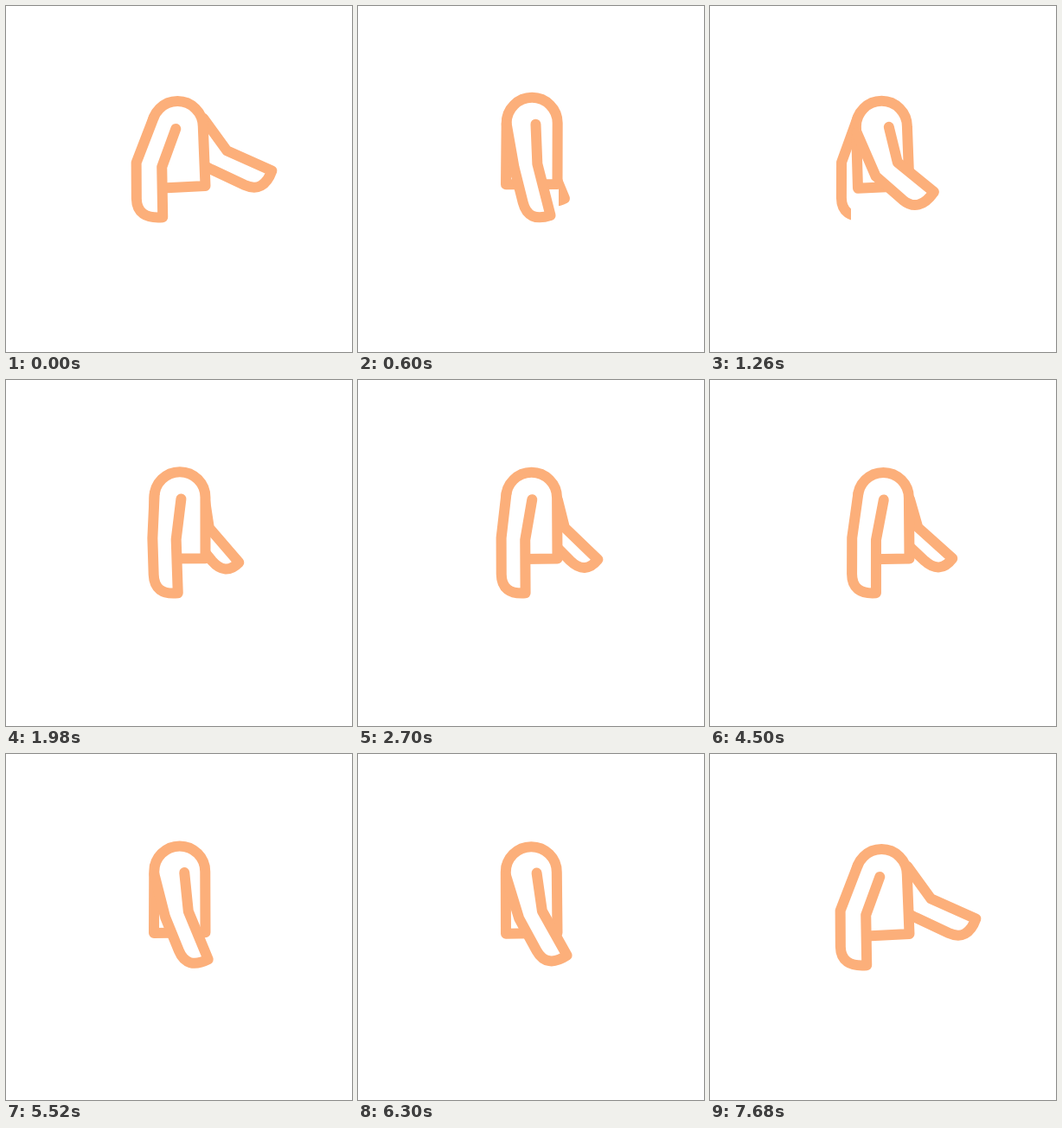
An HTML page with a canvas that plays this animation: 400 px wide and 400 px high, repeating every 7800 ms.

```html
<!DOCTYPE html>
<html lang="en">
<head>
<meta charset="utf-8">
<title>Walking jacket</title>
<style>
html, body { margin: 0; height: 100%; overflow: hidden; background: #fff; }
canvas { display: block; }
</style>
</head>
<body>
<canvas id="stage" width="400" height="400"></canvas>
<script>
const g = document.getElementById('stage').getContext('2d');
const INK = '#fcaf7a', PAPER = '#fff';
const LOOP = 7800, STEP = 60, STRIDE = 2410, STRIDES = 3, RADIUS = 29.5;

const ramp = (t, from, to) => Math.min(1, Math.max(0, (t - from) / (to - from)));

// Near arm's swing: -1 is fully back, 1 fully forward; it rests after the last stride.
function swingAt(t) {
  const p = t < STRIDES * STRIDE ? t % STRIDE : 0;
  return 2 * (ramp(p, 60, 960) - ramp(p, 1250, 2340)) - 1;
}

// Value between the back and forward extremes, bowed in mid-swing.
const mix = (s, back, front, bow = 0) =>
  (back + front) / 2 + (front - back) / 2 * s + bow * (1 - s * s);

const radians = deg => deg * Math.PI / 180;

function nearArm(s) {
  return {
    dx: mix(s, -2, 8.5), dy: mix(s, 2.5, 0.5),
    upper: radians(mix(s, -20, 14, 2)), upperLength: mix(s, 47, 42, 2),
    fore: radians(mix(s, 1, 52, -18)), foreLength: mix(s, 58, 54, 6),
    width: mix(s, 30, 30, -3)
  };
}

function farArm(s) {
  return {
    dx: mix(s, -2, 30, 11), dy: mix(s, 2.5, -9.5, 11),
    upper: radians(mix(s, -20, 36, -10)), upperLength: mix(s, 47, 46, -17),
    fore: radians(mix(s, 0, 66, -4)), foreLength: mix(s, 58, 57, -5),
    width: mix(s, 30, 28, -7)
  };
}

function paint() {
  g.fillStyle = PAPER;
  g.fill();
  g.stroke();
}

function drawArm(cx, cy, { dx, dy, upper, upperLength, fore, foreLength, width }) {
  const sin = Math.sin(fore), cos = Math.cos(fore), bend = (upper + fore) / 2;
  const sx = cx + dx, sy = cy + dy;
  const ex = sx + upperLength * Math.sin(upper), ey = sy + upperLength * Math.cos(upper);
  // point of the forearm: along it from the elbow, then across it
  const forearm = (along, across) =>
    [ex + along * sin - across * cos, ey + along * cos + across * sin];
  g.beginPath();
  g.moveTo(cx - RADIUS * Math.cos(upper), cy + RADIUS * Math.sin(upper));
  g.lineTo(ex - width * Math.cos(bend), ey + width * Math.sin(bend));
  g.lineTo(...forearm(foreLength - 22, width));
  g.quadraticCurveTo(...forearm(foreLength + 2, width), ...forearm(foreLength, 0));
  g.lineTo(ex, ey);
  g.lineTo(sx, sy);
  paint();
}

function drawTorso(cx, cy, lean) {
  g.beginPath();
  g.arc(cx, cy, RADIUS, Math.PI, 0);
  g.lineTo(230.5, 206 + 2 * lean);
  g.lineTo(171, 206 + 5 * lean);
  g.closePath();
  paint();
}

function draw(t) {
  const swing = swingAt(t), lean = swing * swing;
  const cx = 201.3 - 3 * lean, cy = 135.2 + 4.3 * lean;
  g.fillStyle = PAPER;
  g.fillRect(0, 0, 400, 400);
  g.strokeStyle = INK;
  g.lineWidth = 12;
  g.lineCap = g.lineJoin = 'round';
  drawArm(cx, cy, farArm(-swing));
  g.fillStyle = PAPER;
  g.fillRect(163, 200, 69, 180); // legs hide the far hand
  drawTorso(cx, cy, lean);
  drawArm(cx, cy, nearArm(swing));
}

const start = performance.now();
function tick() {
  const t = (performance.now() - start) % LOOP;
  draw(Math.floor(t / STEP) * STEP);
  requestAnimationFrame(tick);
}
tick();
</script>
</body>
</html>
```
